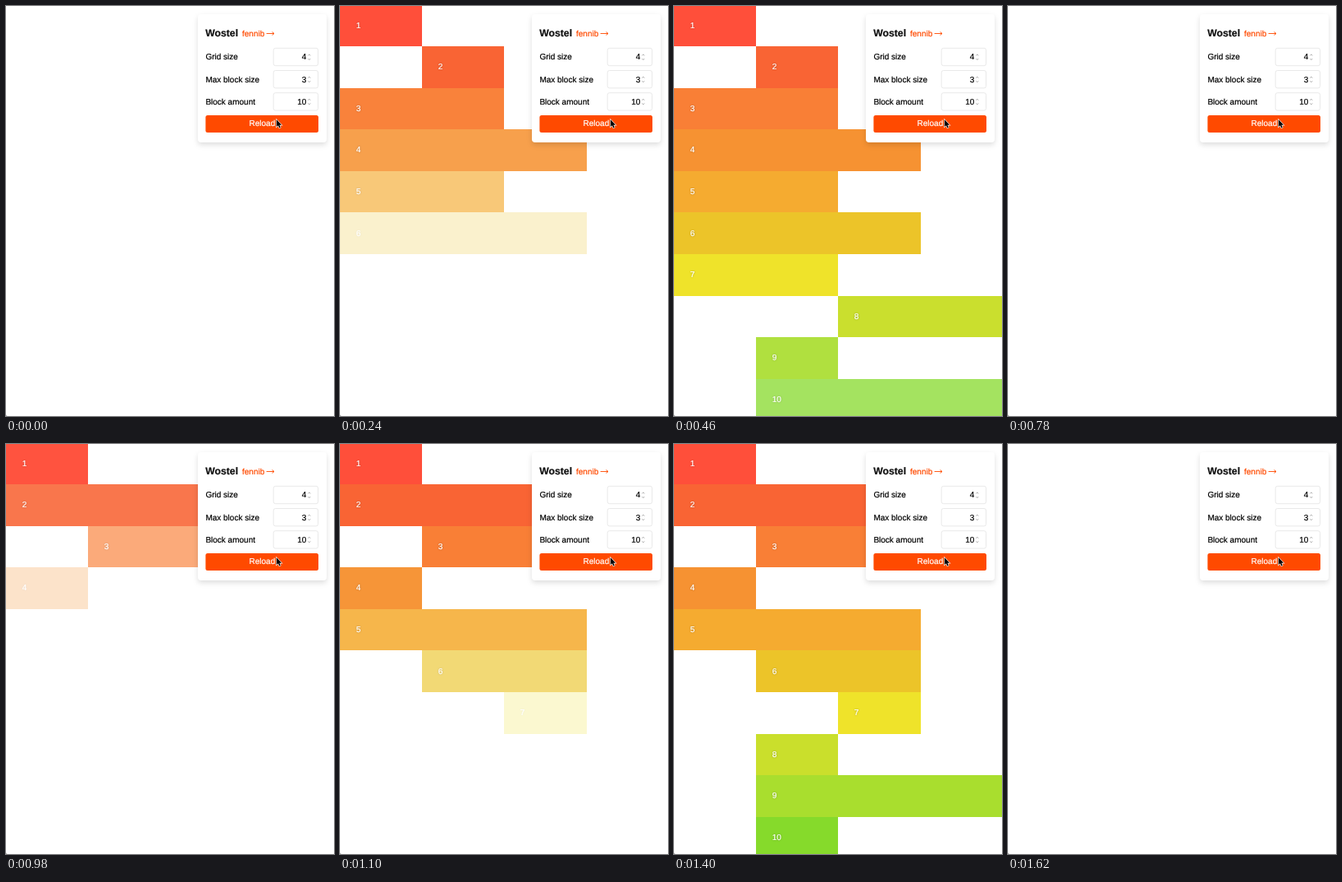
An HTML page that plays this animation: 400x499 px, repeating every 1.64 s.

```html
<!DOCTYPE html>
<html lang="en">
<head>
<meta charset="utf-8">
<title>Block grid</title>
<style>
  html, body { margin: 0; width: 100%; height: 100%; overflow: hidden; background: #fff; }
  svg { display: block; width: 400px; height: 499px; }
  text {
    font: 10px "Liberation Sans", Arial, sans-serif;
    text-rendering: geometricPrecision;
    fill: #000; stroke: #000; stroke-width: .2;
  }
  .light { fill: #fff; stroke: #fff; }
  .num { filter: drop-shadow(0 0.5px 0.8px rgba(0, 0, 0, .25)); }
  .panel { fill: #fff; filter: drop-shadow(0 3px 3px rgba(0, 0, 0, .13)); }
  .title { font-size: 12.2px; font-weight: bold; fill: #111; stroke: #111; }
  .link { fill: #ff4a00; stroke: #ff4a00; }
  .arrow { fill: none; stroke: #ff4a00; stroke-width: .9; }
  .value { text-anchor: end; }
  .field { fill: #fff; stroke: #e9e9e9; }
  .spin { fill: none; stroke: #999; stroke-width: .8; }
  .cursor { fill: #000; stroke: #fff; stroke-width: 1.2; paint-order: stroke; }
</style>
</head>
<body>
<svg viewBox="0 0 400 499" xmlns="http://www.w3.org/2000/svg">
  <rect width="400" height="499" fill="#fff"/>
  <g id="blocks"></g>
  <path d="M0 497.2Q.3 498.7 1.8 499H0Z" fill="#999"/>
  <rect class="panel" x="234" y="10" width="157" height="156" rx="4"/>
  <text class="title" x="243.3" y="36.6">Wostel</text>
  <text class="link" x="288" y="36.6">fennib</text>
  <path class="arrow" d="M317.6 33.5h9.4m-2.4-2l2.4 2-2.4 2"/>
  <g id="fields"></g>
  <rect x="243.4" y="133" width="137.6" height="21" rx="2.5" fill="#ff4a00"/>
  <text class="light" x="312.4" y="146.4" text-anchor="middle">Reload</text>
  <path class="cursor" d="M329.9 138.2v8.9l2-1.8 1.4 3.1 1.5-.7-1.4-2.9h2.7Z"/>
</svg>
<script>
const NS = "http://www.w3.org/2000/svg";
const RUN = 820, LEAD = 40, START = 2, STAGGER = 41, FADE = 200;
const COL = 100.2, ROW = 50.6, TOP = -1.6;

const colors = ["#ff4f3a", "#f96434", "#f97f36", "#f69232", "#f5ab30",
                "#ecc429", "#efe32a", "#cadf2c", "#a9de2e", "#86da2b"];

// one "column, span" pair per row
const layouts = [
  ["01", "11", "02", "03", "02", "03", "02", "22", "11", "13"],
  ["01", "03", "12", "01", "03", "12", "21", "11", "13", "11"]
];

function add(parent, tag, attrs, text) {
  const el = document.createElementNS(NS, tag);
  for (const key in attrs) el.setAttribute(key, attrs[key]);
  if (text !== undefined) el.textContent = text;
  return parent.appendChild(el);
}

function makeBlock(parent, spec, row) {
  const [col, span] = [...spec].map(Number);
  const x = Math.round(col * COL), right = Math.round((col + span) * COL);
  const y = Math.round(TOP + row * ROW), bottom = Math.round(TOP + (row + 1) * ROW);
  const block = add(parent, "g", { opacity: 0 });
  add(block, "rect", { x, y, width: right - x, height: bottom - y, fill: colors[row] });
  add(block, "text", { class: "num light", x: 19.8 + col * 100, y: TOP + row * ROW + 28.2 }, row + 1);
  return block;
}

function makeField(label, value, row) {
  const parent = document.getElementById("fields");
  const y = 62 + row * 27.2;
  add(parent, "text", { x: 243.4, y: y + 3.4 }, label);
  add(parent, "rect", { class: "field", x: 326.2, y: y - 10.7, width: 54.4, height: 21.4, rx: 2.5 });
  add(parent, "text", { class: "value", x: 366.4, y: y + 3.4 }, value);
  add(parent, "path", { class: "spin", d: `M368.4 ${y - 1.6}l1.4-1.6 1.4 1.6m-2.8 3.6l1.4 1.6 1.4-1.6` });
}

// cubic-bezier(.25, .1, .25, 1)
function ease(x) {
  if (x <= 0) return 0;
  if (x >= 1) return 1;
  const curve = (s, a, b) => 3 * s * (1 - s) ** 2 * a + 3 * s * s * (1 - s) * b + s ** 3;
  let lo = 0, hi = 1;
  for (let i = 0; i < 24; i++) {
    const mid = (lo + hi) / 2;
    if (curve(mid, .25, .25) < x) lo = mid; else hi = mid;
  }
  return curve(lo, .1, 1);
}

[["Grid size", 4], ["Max block size", 3], ["Block amount", 10]]
  .forEach(([label, value], row) => makeField(label, value, row));

const runs = layouts.map(layout => {
  const group = add(document.getElementById("blocks"), "g", {});
  return { group, blocks: layout.map((spec, row) => makeBlock(group, spec, row)) };
});

function draw(time) {
  const t = (time + LEAD) % (RUN * runs.length);
  const active = Math.floor(t / RUN);
  const local = t % RUN - LEAD - START;
  runs.forEach(({ group, blocks }, i) => {
    group.setAttribute("display", i === active ? "inline" : "none");
    if (i !== active) return;
    blocks.forEach((block, row) =>
      block.setAttribute("opacity", ease((local - row * STAGGER) / FADE).toFixed(4)));
  });
}

const begin = performance.now();
function tick() {
  draw(performance.now() - begin);
  requestAnimationFrame(tick);
}
tick();
</script>
</body>
</html>
```
